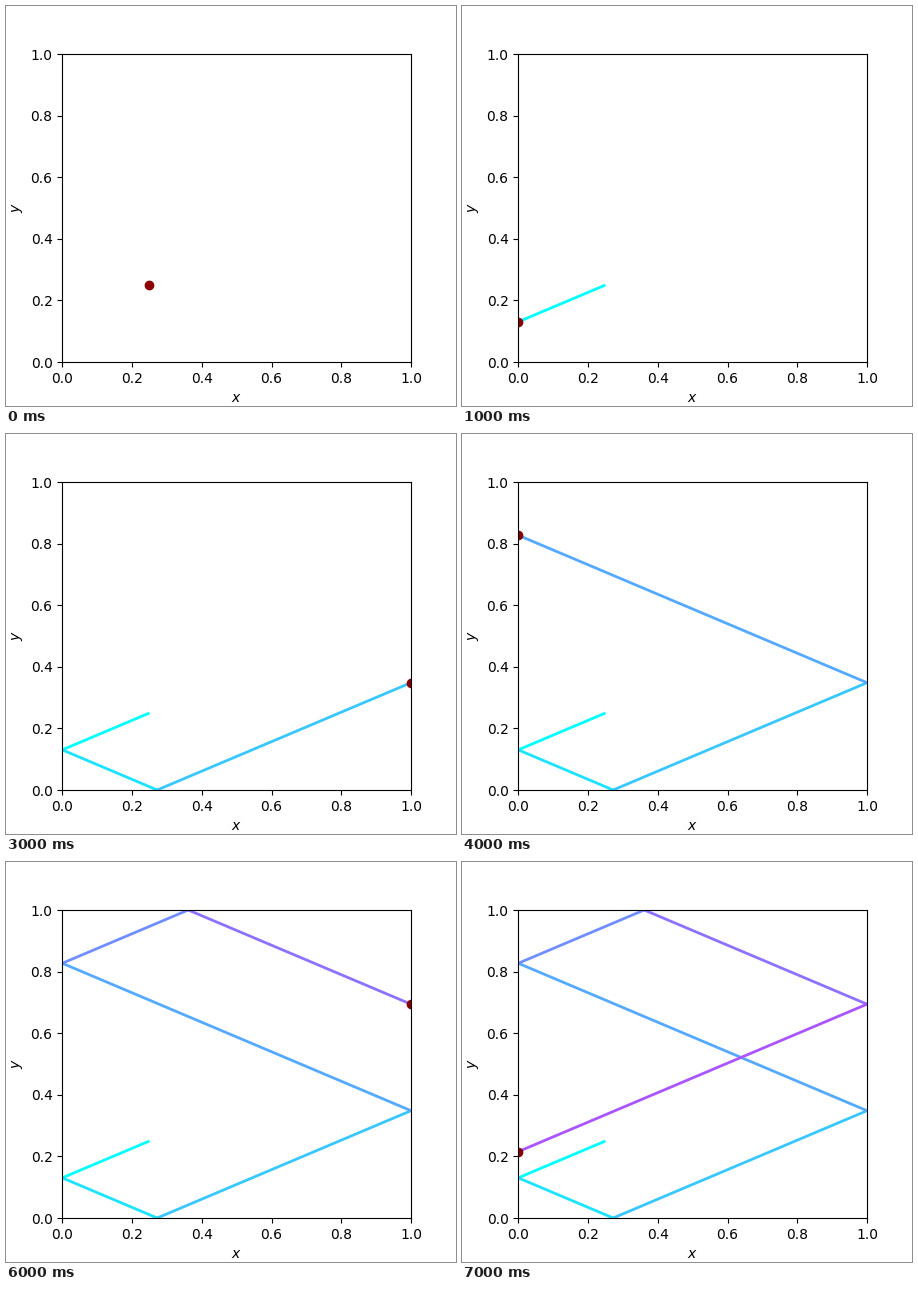
Animation, 450 px wide and 400 px high, one loop 8000 ms. Source, as a matplotlib script:

```python
import numpy as np
import matplotlib.pyplot as plt
from matplotlib.animation import FuncAnimation
from matplotlib.collections import LineCollection

BOUNCES = 7
START = (0.25, 0.25)
VELOCITY = (-1.0, -0.4787)


def bounce_path(start, velocity, count):
    """Start point followed by each wall hit inside the unit square."""
    pos, vel = np.array(start), np.array(velocity)
    points = [pos.copy()]
    for _ in range(count):
        wall = (vel > 0).astype(float)
        times = (wall - pos) / vel
        axis = int(np.argmin(times))
        pos = pos + vel * times[axis]
        pos[axis] = wall[axis]
        vel[axis] *= -1
        points.append(pos.copy())
    return np.array(points)


path = bounce_path(START, VELOCITY, BOUNCES)
segments = np.stack([path[:-1], path[1:]], axis=1)
colors = plt.get_cmap("cool")(np.arange(BOUNCES) / 9)

fig, ax = plt.subplots(figsize=(4.5, 4), dpi=100)
ax.set(xlim=(0, 1), ylim=(0, 1), xlabel="$x$", ylabel="$y$")
trail = ax.add_collection(LineCollection([], linewidths=2))
ball, = ax.plot([], [], "o", color="darkred")


def draw(i):
    trail.set_segments(list(segments[:i]))
    trail.set_color(colors[:i])
    ball.set_data([path[i, 0]], [path[i, 1]])
    return trail, ball


anim = FuncAnimation(fig, draw, frames=BOUNCES + 1, interval=1000,
                     repeat=True, repeat_delay=0)
plt.show()
```
